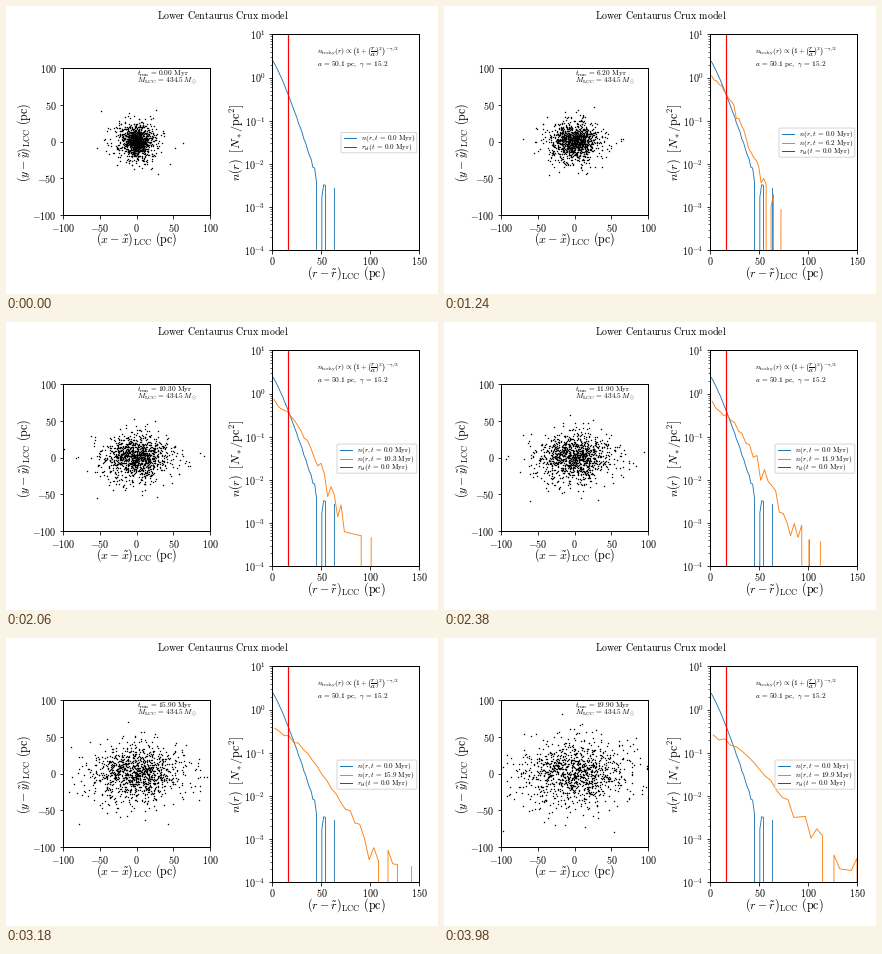
Write a matplotlib script that moves like this. It is 432 px wide and 288 px high and loops after 4 s.

```python
import matplotlib.pyplot as plt
import numpy as np
from matplotlib.animation import FuncAnimation
from matplotlib.markers import TICKLEFT
from matplotlib.patches import FancyBboxPatch

W, H, DPI = 432, 288, 72
FRAMES, INTERVAL = 200, 20
MYR_PER_FRAME = 0.1
BIN = 1.835  # starting bin width in pc
EQ = r"\,=\,"

plt.rcParams.update({
    "mathtext.fontset": "cm",
    "axes.linewidth": 1,
    "xtick.labelsize": 10,
    "ytick.labelsize": 10,
})
fig = plt.figure(figsize=(W / DPI, H / DPI), dpi=DPI, facecolor="white")


def panel(left, top, right, bottom):
    return fig.add_axes([left / W, 1 - bottom / H, (right - left) / W, (bottom - top) / H])


def rm(text):
    """Upright text with full word spaces, for use inside math."""
    return r"\hspace{0.38}".join(rf"\mathrm{{{w}}}" if w else "" for w in text.split(" "))


def numbers(values):
    return [f"${v}$" for v in values]


# Panels
sky = panel(57.2, 62, 204.2, 209)
sky.set(xlim=(-100, 100), ylim=(-100, 100))
marks = range(-100, 101, 50)
sky.set_xticks(marks, numbers(marks))
sky.set_yticks(marks, numbers(marks))

prof = panel(266.4, 28.4, 413.4, 244.4)
prof.set_yscale("log")
prof.set(xlim=(0, 150), ylim=(1e-4, 10))
marks = range(0, 151, 50)
prof.set_xticks(marks, numbers(marks))
prof.tick_params(axis="x", pad=1.2)
decades = np.arange(-4, 2)
prof.set_yticks(10.0 ** decades, [f"$10^{{{d}}}$" for d in decades])
prof.minorticks_off()
minor = np.outer(10.0 ** decades[:-1], np.arange(2, 10)).ravel()
prof.plot(np.zeros(minor.size), minor, ls="none", marker=TICKLEFT, ms=2, mew=0.6,
          color="black", clip_on=False, transform=prof.get_yaxis_transform())

# Pixel-space layer for text and legend
page = panel(0, 0, W, H)
page.set(xlim=(0, W), ylim=(H, 0))
page.axis("off")


def put(x, y, text, size, **kw):
    return page.text(x, y, f"${text}$", fontsize=size, va="baseline", **kw)


def label(x, y, text, rotation=0):
    put(x, y, text, 12, ha="center", rotation=rotation, rotation_mode="anchor")


lcc = r"_{\mathrm{LCC}}"


def offset(v):
    return rf"({v}-\tilde{{{v}}}){lcc}" + rm(" (pc)")


put(216.5, 13, rm("Lower Centaurus Crux model"), 10, ha="center")
label(131, 237, offset("x"))
label(340, 270.3, offset("r"))
label(22, 136, offset("y"), 90)
label(234, 136, r"n(r)\ \ [N_*/\mathrm{pc}^2]", 90)
clock = put(131, 69.8, "t", 7.3)
put(131, 76.3, rf"M{lcc}{EQ}434.5\,M_\odot", 7.4)
put(311, 47.8, r"n_{\mathrm{today}}(r)\propto\left(1+\left(\dfrac{r}{a}\right)^2\right)^{-\gamma/2}", 7.4)
put(311, 60.2, rf"a{EQ}50.1" + rm(" pc, ") + rf"\gamma{EQ}15.2", 7.3)

# Stars: a round core with a few outliers, drifting faster along x than along y
rng = np.random.default_rng(12)
grid = np.linspace(0, 25 * BIN, 500)
weight = 2 * np.pi * grid * 10 ** (0.39 - 1.65 * (grid / 30) ** 1.2)
cumulative = np.cumsum(weight) * grid[1]
core = int(cumulative[-1])
inner = np.interp(np.arange(core) + rng.random(core), cumulative, grid)
outer = BIN * (np.array([27, 28, 28, 29, 29, 34, 34]) + 0.5)
radius = np.append(inner, outer)
angle = rng.uniform(0, 2 * np.pi, radius.size)
start = radius * np.array([np.cos(angle), np.sin(angle)])
speed = rng.standard_t(7, size=start.shape) * np.array([[1.6], [0.8]])
speed = np.clip(speed, [[-7], [-3]], [[7], [3]])


def profile(stars, width):
    """Surface density of the stars in rings of equal width."""
    r = np.hypot(*stars)
    edges = np.arange(0, r.max() + width, width)
    count, _ = np.histogram(r, edges)
    density = count / (np.pi * np.diff(edges ** 2))
    return edges[:-1] + width / 2, np.maximum(density, 1e-60)


dots, = sky.plot([], [], "o", color="black", ms=1.45, mew=0)
prof.plot(*profile(start, BIN), color="C0", lw=0.9)
orange, = prof.plot([], [], color="C1", lw=0.9)
prof.axvline(15.8, color="red", lw=1.2)

# Legend
ROW = 8.7


def entry(t, curve="n(r,"):
    return rf"{curve}t{EQ}{t:.1f}" + r"\ \mathrm{Myr})"


box = FancyBboxPatch((0, 0), 1, 1, boxstyle="round,pad=0,rounding_size=1.2",
                     fc=(1, 1, 1, 0.8), ec="0.8", lw=0.8)
page.add_patch(box)
rows = [(page.plot([], [], color=color, lw=1)[0], put(0, 0, text, 7.1))
        for color, text in [("C0", entry(0)), ("C1", entry(0)),
                            ("red", entry(0, r"r_{\mathrm{hl}}("))]]


def lay_out_legend(t):
    shown = [row for row in rows if t > 0 or row is not rows[1]]
    left = 331 if t >= 10 else 335
    height = ROW * len(shown) + 3
    top = 136.6 - height / 2
    box.set_bounds(left, top, 410.8 - left, height)
    for i, (line, text) in enumerate(shown):
        y = top + 1.5 + ROW * (i + 0.5)
        line.set_data([left + 2.5, left + 15], [y, y])
        text.set_position((left + 20, y + 2))
    for artist in rows[1]:
        artist.set_visible(t > 0)
    rows[1][1].set_text(f"${entry(t)}$")


def update(frame):
    t = frame * MYR_PER_FRAME
    stars = start + speed * t
    dots.set_data(*stars)
    orange.set_data(*profile(stars, np.hypot(BIN, 0.28 * t)))
    orange.set_visible(frame > 0)
    clock.set_text(rf"$t_{{\mathrm{{run}}}}{EQ}{t:.2f}" + rm(" Myr") + "$")
    lay_out_legend(t)
    return dots, orange, clock, box


anim = FuncAnimation(fig, update, frames=FRAMES, interval=INTERVAL, repeat=True,
                     repeat_delay=0, blit=False)
plt.show()
```
